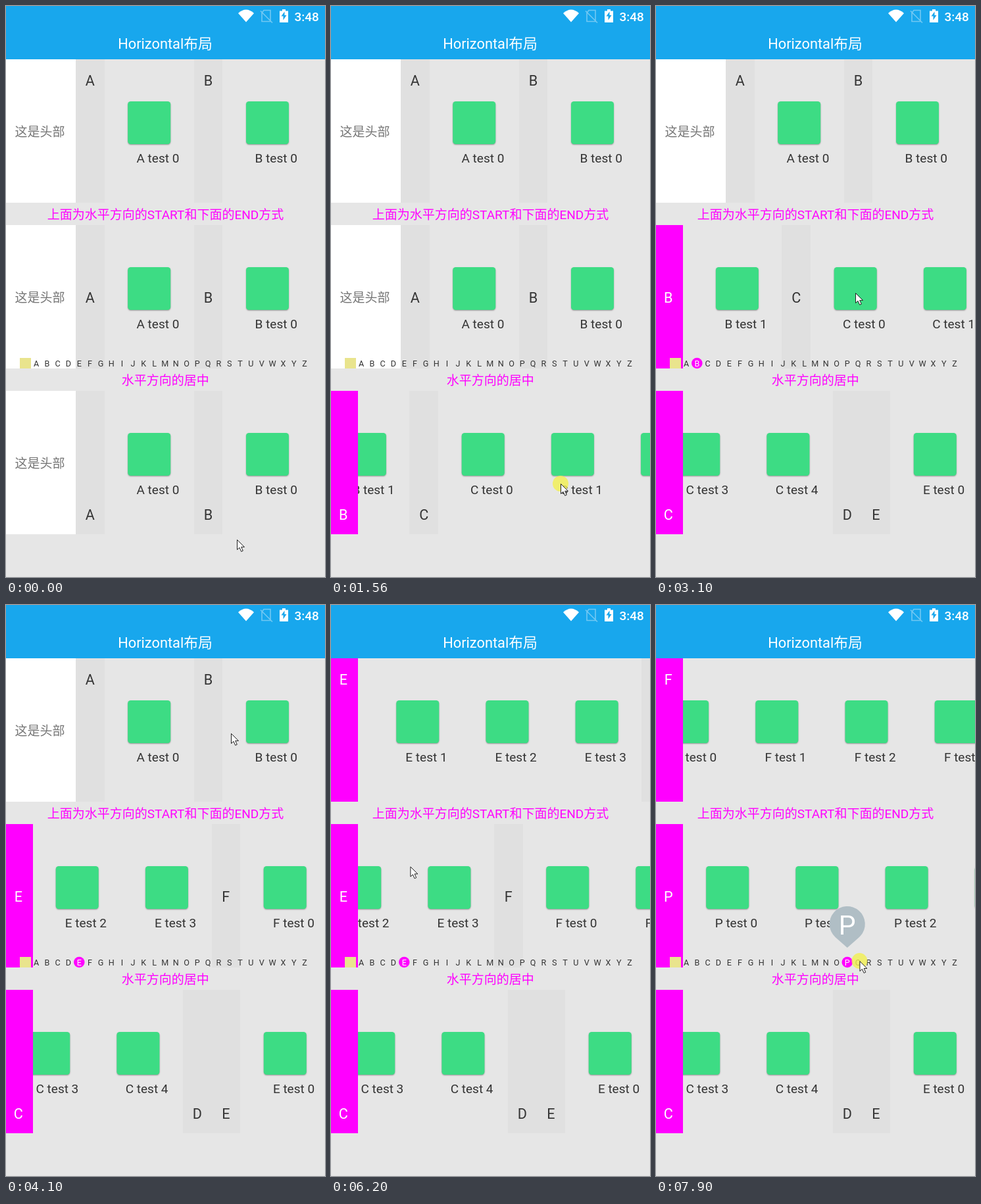
An HTML page with a canvas for the animation above (7990 ms loop, 485 px wide and 868 px high).

```html
<!DOCTYPE html>
<html lang="zh">
<head>
<meta charset="utf-8">
<title>Horizontal布局</title>
<style>
  html, body { margin: 0; width: 100%; height: 100%; overflow: hidden; background: #e6e6e6; }
  canvas { display: block; width: 485px; height: 868px; }
</style>
</head>
<body>
<canvas id="stage"></canvas>
<script>
const W = 485, H = 868, LOOP = 7990;
const HEAD = 106, TAB = 43.6, ITEM = 136.2, ROW = 218, PIN = -3;
const FONT = 'Roboto, "Noto Sans CJK SC", "Noto Sans CJK", sans-serif';
const MAGENTA = '#f0f', BLUE = '#18a7ed';
const BODY = 19;

const canvas = document.getElementById('stage');
const ctx = canvas.getContext('2d');
const ratio = window.devicePixelRatio || 1;
canvas.width = W * ratio;
canvas.height = H * ratio;

// Sections A to Z with their item counts, laid out from left to right
const counts = [1, 2, 5, 0, 4];
let end = HEAD;
const sections = Array.from({ length: 26 }, (_, i) => {
  const section = { letter: String.fromCharCode(65 + i), x: end, count: counts[i] ?? 6 };
  end += TAB + section.count * ITEM;
  return section;
});

// Each swipe drags its row with the pointer, then glides to scroll `stop` at time `rest`
const swipes = [
  { row: 'bottom', press: 350, release: 640, from: [400, 710], to: [215, 715], rest: 1450, stop: 482.3 },
  { row: 'bottom', press: 1570, release: 1790, from: [349, 726], to: [140, 715], rest: 2500, stop: 1057.4 },
  { row: 'middle', press: 2200, release: 2450, from: [370, 460], to: [150, 450], rest: 3060, stop: 410.3 },
  { row: 'middle', press: 3190, release: 3390, from: [303, 436], to: [90, 430], rest: 4330, stop: 1710.4 },
  { row: 'top', press: 4230, release: 4480, from: [342, 195], to: [142, 190], rest: 4950, stop: 292.3 },
  { row: 'top', press: 5160, release: 5500, from: [342, 188], to: [100, 186], rest: 7254, stop: 2022.5 },
  { row: 'index', press: 7150, release: LOOP, from: [136, 559], to: [330, 539] },
];
const PRESS_LEAD = 60, INDEX_LAG = 80, TRAVEL = 0.78;
const indexing = swipes[swipes.length - 1];

const clamp = v => Math.max(0, Math.min(1, v));
const lerp = (a, b, f) => a + (b - a) * f;
const mix = (a, b, f) => a.map((v, i) => lerp(v, b[i], f));
const smooth = f => f * f * (3 - 2 * f);
const decelerate = f => 1 - (1 - f) ** 2;
const progress = (t, from, to) => clamp((t - from) / (to - from));

function pointerAt(t) {
  let time = 0, place = [351, 811];
  for (const s of swipes) {
    if (t < s.press) {
      const arrival = lerp(time, s.press, TRAVEL);
      return mix(place, s.from, smooth(progress(t, time, arrival)));
    }
    if (t < s.release) return mix(s.from, s.to, progress(t, s.press, s.release));
    time = s.release;
    place = s.to;
  }
  return place;
}

function scrollAt(row, t) {
  let scroll = 0;
  for (const s of swipes) {
    if (s.row !== row || t < s.press) continue;
    const dragged = scroll + (s.from[0] - s.to[0]) * progress(t, s.press, s.release);
    scroll = lerp(dragged, s.stop, decelerate(progress(t, s.release, s.rest)));
  }
  return scroll;
}

function rect(x, y, w, h, color) {
  ctx.fillStyle = color;
  ctx.fillRect(x, y, w, h);
}

function disc(x, y, r, color) {
  ctx.fillStyle = color;
  ctx.beginPath();
  ctx.arc(x, y, r, 0, 7);
  ctx.fill();
}

function shape(path, x, y, fill, stroke) {
  ctx.save();
  ctx.translate(x, y);
  const p = new Path2D(path);
  if (fill) { ctx.fillStyle = fill; ctx.fill(p); }
  if (stroke) { ctx.strokeStyle = stroke; ctx.stroke(p); }
  ctx.restore();
}

function text(str, x, baseline, size, color, weight = 400) {
  ctx.font = `${weight} ${size}px ${FONT}`;
  ctx.fillStyle = color;
  ctx.fillText(str, x, baseline);
}

function tile(x, y) {
  ctx.save();
  ctx.shadowColor = 'rgba(0,0,0,.35)';
  ctx.shadowBlur = 2 * ratio;
  ctx.shadowOffsetY = ratio;
  ctx.fillStyle = '#3ddc84';
  ctx.beginPath();
  ctx.roundRect(x, y, 65, 65, 4.5);
  ctx.fill();
  ctx.restore();
}

function tab(letter, x, y, letterY, glow) {
  const left = Math.round(x), right = Math.round(x + TAB);
  rect(left, y, right - left, ROW, `rgb(${mix([224, 224, 224], [255, 0, 255], glow)})`);
  text(letter, x + TAB / 2, letterY, 21.6, `rgb(${mix([51, 51, 51], [255, 255, 255], glow)})`);
}

const pinnedIndex = scroll => sections.findLastIndex(s => s.x - scroll <= PIN);

function drawRow(y, letterY, scroll) {
  ctx.save();
  ctx.beginPath();
  ctx.rect(0, y, W, ROW);
  ctx.clip();
  if (scroll < HEAD) {
    rect(-scroll, y, HEAD, ROW, '#fff');
    text('这是头部', 51.5 - scroll, y + 116.5, BODY, '#757575');
  }
  for (const s of sections) {
    for (let i = 0; i < s.count; i++) {
      const x = s.x + TAB + i * ITEM - scroll;
      if (x < -ITEM || x > W) continue;
      tile(x + 35.6, y + 64);
      text(`${s.letter} test ${i}`, x + 81.3, y + 157.3, BODY, '#333');
    }
  }
  const pinned = pinnedIndex(scroll);
  sections.forEach((s, i) => {
    const x = s.x - scroll;
    if (i > pinned && x < W) tab(s.letter, x, y, letterY, clamp(1 - (x - PIN) / TAB));
  });
  if (pinned >= 0) {
    const next = sections[pinned + 1];
    const x = next ? Math.min(PIN, next.x - scroll - TAB) : PIN;
    tab(sections[pinned].letter, x, y, letterY, clamp(1 - (PIN - x) / TAB));
  }
  ctx.restore();
}

function drawBars() {
  rect(0, 0, W, 81, BLUE);
  text('Horizontal布局', 242, 65, 21.8, '#fff');
  text('3:48', 457.2, 22.6, 19, '#fff', 500);
  shape('M0 5.5Q12 -5.5 24 5.5L12 19Z', 353, 5.5, '#fff');
  ctx.lineWidth = 1.6;
  shape('M5 1H15V18H2V5ZM0 2L18 20', 387, 5.5, null, '#72c8f3');
  shape('M0 2.5H4V0H9V2.5H13V20H0Z', 416, 5, '#fff');
  shape('M5 0L0 7H3V13L8 5.5H5Z', 418.5, 8.5, BLUE);
}

const INDEX_LEFT = 46, INDEX_STEP = 16.32;
const indexX = i => INDEX_LEFT + i * INDEX_STEP;
const indexUnder = x => Math.round((x - INDEX_LEFT) / INDEX_STEP);

function drawIndex(selected) {
  rect(21, 535, 17, 16, '#e9e48d');
  sections.forEach((s, i) => {
    const on = i === selected;
    if (on) disc(indexX(i), 543, 8.3, MAGENTA);
    text(s.letter, indexX(i), 548.2, 12.6, on ? '#fff' : '#333');
  });
}

function drawBubble(selected) {
  const x = indexX(selected), y = 485, r = 27, drop = 36;
  const spread = Math.acos(r / drop);
  ctx.fillStyle = '#b0bec5';
  ctx.beginPath();
  ctx.arc(x, y, r, Math.PI / 2 + spread, Math.PI * 2.5 - spread);
  ctx.lineTo(x, y + drop);
  ctx.fill();
  text(sections[selected].letter, x, y + 15.5, 41, '#fff');
}

function drawPointer(t) {
  const [x, y] = pointerAt(t);
  const pressed = swipes.some(s => t >= s.press - PRESS_LEAD && t < s.release);
  if (pressed) disc(x, y, 12, 'rgba(243,240,80,.8)');
  ctx.lineWidth = 1;
  shape('M.5 .5V15.5L4 12.3L6.7 18.3L9.3 17.1L6.7 11.4H11.5Z', x, y, '#fff', '#222');
}

function draw(t) {
  ctx.setTransform(ratio, 0, 0, ratio, 0, 0);
  ctx.textAlign = 'center';
  rect(0, 0, W, H, '#e6e6e6');

  const touchTime = t - INDEX_LAG;
  const touching = touchTime >= indexing.press;
  let middle = scrollAt('middle', t);
  let selected = pinnedIndex(middle);
  if (touching) {
    selected = indexUnder(pointerAt(touchTime)[0]);
    middle = sections[selected].x - PIN;
  }

  drawRow(81, 120.8, scrollAt('top', t));
  drawRow(333, 450.8, middle);
  drawRow(585, 780.8, scrollAt('bottom', t));
  drawBars();
  text('上面为水平方向的START和下面的END方式', 242.5, 324, BODY, MAGENTA);
  text('水平方向的居中', 242.2, 576, BODY, MAGENTA);
  drawIndex(selected);
  if (touching) drawBubble(selected);
  drawPointer(t);
}

const began = performance.now();
function frame() {
  draw((performance.now() - began) % LOOP);
  requestAnimationFrame(frame);
}
frame();
</script>
</body>
</html>
```
